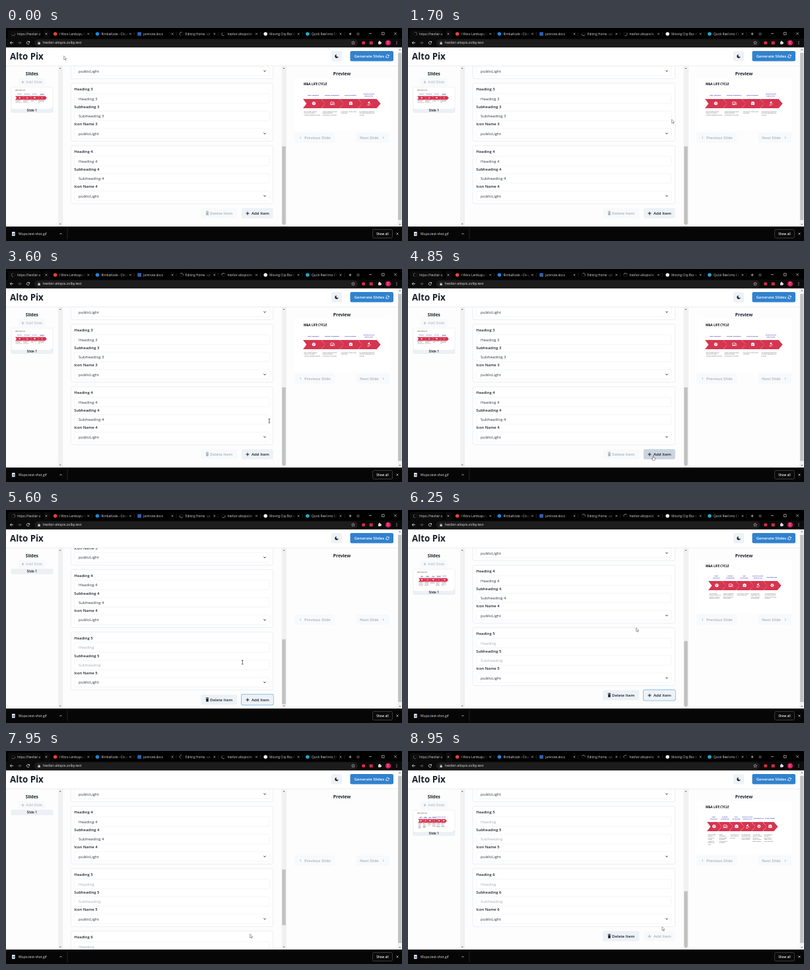
These frames come from a looping animation (600 by 324 pixels, 9 s). An HTML page with a canvas:

```html
<!DOCTYPE html>
<html lang="en">
<head>
<meta charset="utf-8">
<title>Slide editor</title>
<style>
html, body { margin: 0; width: 100%; height: 100%; overflow: hidden; background: #fff; }
canvas { display: block; width: 600px; height: 324px; }
</style>
</head>
<body>
<canvas id="stage"></canvas>
<script>
const W = 600, H = 324, LOOP = 9000;
const canvas = document.getElementById('stage');
const ratio = window.devicePixelRatio || 1;
canvas.width = W * ratio;
canvas.height = H * ratio;
const c = canvas.getContext('2d');
const INK = '#1a202c', MUTED = '#a9b1bd', EDGE = '#e2e6ec', RED = '#d63550';

// Scroll area: one card per item, buttons after the last card.
const VIEW = { top: 58, height: 243 }, PITCH = 95, FIELDS = [16, 42.5, 69];
const ADD1 = 4950, ADD2 = 7650;

const clamp = v => Math.max(0, Math.min(1, v));
const ease = v => { v = clamp(v); return v * v * (3 - 2 * v); };

function rect(x, y, w, h, fill, r = 0, stroke, lw = 0.5) {
  c.beginPath();
  c.roundRect(x, y, w, h, r);
  if (fill) { c.fillStyle = fill; c.fill(); }
  if (stroke) { c.strokeStyle = stroke; c.lineWidth = lw; c.stroke(); }
}

function disc(x, y, r, fill) {
  c.beginPath();
  c.arc(x, y, r, 0, 7);
  c.fillStyle = fill;
  c.fill();
}

function line(points, color, lw = 0.7, close = false, fill) {
  c.beginPath();
  for (let i = 0; i < points.length; i += 2) c.lineTo(points[i], points[i + 1]);
  if (close) c.closePath();
  if (fill) { c.fillStyle = fill; c.fill(); }
  if (color) { c.strokeStyle = color; c.lineWidth = lw; c.stroke(); }
}

function arc(x, y, r, from, to, color, lw = 0.8) {
  c.beginPath();
  c.arc(x, y, r, from, to);
  c.strokeStyle = color;
  c.lineWidth = lw;
  c.stroke();
}

function text(s, x, y, size, color = INK, weight = 400, align = 'left') {
  c.font = `${weight} ${size}px "Open Sans", "Noto Sans", sans-serif`;
  c.textAlign = align;
  c.textBaseline = 'alphabetic';
  c.fillStyle = color;
  c.fillText(s, x, y + size * 0.35);
}

function cross(x, y, r, color, lw = 0.6) {
  line([x - r, y - r, x + r, y + r], color, lw);
  line([x + r, y - r, x - r, y + r], color, lw);
}

function plus(x, y, r, color, lw = 0.9) {
  line([x - r, y, x + r, y], color, lw);
  line([x, y - r, x, y + r], color, lw);
}

function chevron(x, y, dx, dy, color, lw = 0.9) {
  line([x - dx - dy * 1.8, y - dy - dx * 1.8, x + dx, y + dy,
        x - dx + dy * 1.8, y - dy + dx * 1.8], color, lw);
}

function refresh(x, y, r, color) {
  arc(x, y, r, 3.5, 5.9, color);
  arc(x, y, r, 0.4, 2.8, color);
  line([x + r + 0.4, y - r, x + r + 0.4, y - 0.3, x + r - 1.7, y - 0.3], null, 0, true, color);
  line([x - r - 0.4, y + r, x - r - 0.4, y + 0.3, x - r + 1.7, y + 0.3], null, 0, true, color);
}

// ---- browser frame ----
const TABS = [
  ['https://hexfair-a'],
  ['I Wora Lembayu Ca', '#e0443a'],
  ['RimbaKode - Cloud', '#1688dd'],
  ['jamnote.docx', '#2b63b8', true],
  ['Editing Home · un'],
  ['hexfair-altopix/wi'],
  ['Moving Clip Box o', '#eeeeee'],
  ['Quick Reel into Cl', '#25a6c9']
];

function drawTabs(t) {
  rect(0, 0, W, 16, '#000');
  rect(3, 3, 64, 14, '#0b0b0b', 3);
  TABS.forEach(([label, icon, square], i) => {
    const x = 11 + i * 63.7;
    if (!icon) {
      const a = -t / 1320 * Math.PI * 2 - i;
      arc(x, 9, 2.7, 0, 7, '#242424', 0.6);
      arc(x, 9, 2.7, a, a + 2.6, i ? '#a0a0a0' : '#777', 0.7);
    } else if (square) rect(x - 2.8, 6.2, 5.6, 5.6, icon, 0.5);
    else disc(x, 9, 2.8, icon);
    c.save();
    c.beginPath();
    c.rect(x + 5, 3, 41, 12);
    c.clip();
    text(label, x + 6, 9, 4.7, '#d8d8d8');
    const fade = c.createLinearGradient(x + 38, 0, x + 46, 0);
    fade.addColorStop(0, 'rgba(0,0,0,0)');
    fade.addColorStop(1, '#000');
    c.fillStyle = fade;
    c.fillRect(x + 38, 3, 8, 12);
    c.restore();
    cross(x + 50, 9, 1.4, '#d0d0d0');
    if (i) line([x + 56, 6, x + 56, 12], '#3c3c3c', 0.5);
  });
  plus(521.5, 9, 2, '#e0e0e0', 0.7);
  disc(533.5, 9, 2.6, '#2a2a2a');
  chevron(533.5, 9, 0, 0.5, '#aaa', 0.5);
  line([550, 8.5, 554, 8.5], '#e8e8e8', 0.6);
  rect(569.5, 6.7, 3.6, 3.6, null, 0, '#e8e8e8', 0.6);
  cross(590, 8.5, 1.9, '#e8e8e8');
}

function drawToolbar() {
  rect(0, 16, W, 13.5, '#0b0b0b');
  line([11, 22.5, 6.3, 22.5], '#ddd', 0.8);
  line([8.5, 20.2, 6.2, 22.5, 8.5, 24.8], '#ddd', 0.8);
  line([18, 22.5, 22.7, 22.5], '#666', 0.8);
  line([20.5, 20.2, 22.8, 22.5, 20.5, 24.8], '#666', 0.8);
  arc(33.5, 22.5, 2.2, 0.5, 5.6, '#ddd');
  line([36, 19.8, 36, 22.2, 33.7, 22.2], null, 0, true, '#ddd');
  rect(43, 17.3, 490, 10.6, '#1c1c1c', 5.3);
  rect(48.3, 22, 3.6, 2.9, '#bdbdbd', 0.4);
  arc(50.1, 22, 1.2, Math.PI, 0, '#bdbdbd', 0.6);
  text('hexfair-altopix.zolby.test', 56, 22.6, 5.15, '#e6e6e6');
  const star = [];
  for (let i = 0; i < 10; i++) {
    const r = i % 2 ? 1.2 : 2.7, a = i * Math.PI / 5 - Math.PI / 2;
    star.push(526 + r * Math.cos(a), 22.6 + r * Math.sin(a));
  }
  line(star, '#d0d0d0', 0.5, true);
  disc(541.7, 22.5, 2.6, '#d9273a');
  rect(550.6, 20.3, 5.2, 4.8, '#c62c3e', 0.5);
  rect(564, 20.8, 4, 4, '#ddd', 0.5);
  disc(566, 20.6, 1, '#ddd');
  disc(568.2, 22.8, 1, '#ddd');
  disc(579, 22.5, 4, '#d81b60');
  text('C', 579, 22.5, 4.6, '#fff', 400, 'center');
  [-2, 0, 2].forEach(d => disc(592, 22.5 + d, 0.6, '#ddd'));
}

function drawShelf() {
  rect(0, 302, W, 22, '#060606');
  rect(9, 310, 4.6, 6.2, '#f2f2f2', 0.4);
  rect(9.8, 312.2, 3, 2.4, '#3f8fd8');
  text('Wupo.test-shot.gif', 19, 313.2, 5, '#e6e6e6');
  chevron(83, 313, 0, -0.8, '#ddd', 0.8);
  line([93, 305, 93, 321], '#3a3a3a', 0.6);
  rect(555.5, 306.5, 30, 13, '#0a0a0a', 2, '#5a5a5a', 0.6);
  text('Show all', 570.5, 313, 4.6, '#f0f0f0', 600, 'center');
  cross(593, 313, 1.5, '#ddd', 0.7);
}

function scrollbar(x, top, bottom, from, to) {
  rect(x, top, 6.4, bottom - top, '#f1f1f1');
  const m = x + 3.2;
  line([m - 1.5, top + 4, m + 1.5, top + 4, m, top + 2.4], null, 0, true, '#606060');
  line([m - 1.5, bottom - 4, m + 1.5, bottom - 4, m, bottom - 2.4], null, 0, true, '#606060');
  if (to) rect(x + 0.5, from, 5.4, to - from, '#c1c1c1');
}

// ---- slide picture ----
const STEPS = [
  ['M&A', 'STRATEGY', 'M&A strategy analyses reasons to achieve continued growth and focus'],
  ['TARGET', 'SCREENING', 'Target screening is about finding the fitting companies for the buyer'],
  ['DUE', 'DILIGENCE', 'The process of a fair check of the facts'],
  ['TRANSACTION', 'EXECUTION', 'By moving the transaction one must negotiate, price and sign'],
  ['INTEGRATION', '', 'It is the step where all of the teams are joined and the work is shared'],
  ['DIVESTITURE', '', 'Also known as the sale of parts that no longer fit the core of the firm']
];
const LAYOUT = { 4: [450, 28, 33.6], 5: [455, 21, 26.6], 6: [453, 17, 22.4] };

function wrap(words, width) {
  const lines = [''];
  for (const word of words.split(' ')) {
    const last = lines[lines.length - 1], next = last ? last + ' ' + word : word;
    if (c.measureText(next).width <= width || !last) lines[lines.length - 1] = next;
    else lines.push(word);
  }
  return lines;
}

const ICONS = {
  globe(x, y) {
    disc(x, y, 2.7, '#fff');
    line([x - 1.8, y - 1.2, x, y - 0.3, x - 0.5, y + 1.7], RED, 0.6);
    line([x + 0.6, y - 2, x + 1.8, y + 0.4], RED, 0.6);
  },
  devices(x, y) {
    rect(x - 2.7, y - 2, 4.7, 3, null, 0.3, '#fff', 0.7);
    line([x - 3.2, y + 2, x + 0.8, y + 2], '#fff', 0.8);
    rect(x + 1.2, y - 0.7, 2, 2.8, RED, 0.2, '#fff', 0.6);
  },
  file(x, y) {
    rect(x - 2.5, y - 2, 5, 4.4, '#fff', 0.6);
    rect(x - 1, y - 2.7, 2, 1, '#fff');
    line([x - 1.3, y - 0.3, x + 1.3, y - 0.3], RED, 0.5);
    line([x - 1.3, y + 1, x + 0.8, y + 1], RED, 0.5);
  },
  gavel(x, y) {
    line([x - 1.8, y - 0.2, x + 0.6, y - 2.5], '#fff', 1.5);
    line([x - 0.6, y - 1.2, x + 2.3, y + 1.7], '#fff', 0.9);
    line([x - 2.8, y + 2.4, x + 0.6, y + 2.4], '#fff', 0.9);
  },
  gear(x, y) {
    for (let a = 0; a < 3; a++) {
      const dx = 2.7 * Math.cos(a * Math.PI / 3), dy = 2.7 * Math.sin(a * Math.PI / 3);
      line([x - dx, y - dy, x + dx, y + dy], '#fff', 1.1);
    }
    disc(x, y, 2, '#fff');
    disc(x, y, 0.9, RED);
  }
};
const ICON_ORDER = ['globe', 'devices', 'file', 'gavel', 'gear', 'file'];

function drawSlide(n) {
  const [left, pitch, width] = LAYOUT[n];
  rect(438, 76, 144, 80, '#fff');
  text('M&A LIFE CYCLE', 451, 85.5, 4.5, '#111', 700);
  for (let i = 0; i < n; i++) {
    const [a, b, note] = STEPS[i], x = left + i * pitch, mid = x + width / 2 - 1;
    line([x, 108, x + width - 6, 108, x + width, 115, x + width - 6, 122, x, 122, x + 5.4, 115],
      null, 0, true, RED);
    ICONS[ICON_ORDER[i]](mid + 0.6, 114.6);
    const label = (s, y) => text(s, mid, y, 2.3, '#2525b4', 700, 'center');
    if (!b || (n === 4 && i < 3)) label(b ? a + ' ' + b : a, 102);
    else { label(a, 100.4); label(b, 103.6); }
    c.font = '400 1.9px "Open Sans", sans-serif';
    wrap(note, pitch - 3).forEach((s, k) => text(s, x + 1.5, 127 + k * 2.55, 1.9, '#222'));
  }
}

// ---- page ----
function button(x, y, w, label, textX, disabled, fill) {
  rect(x, y, w, 15.5, disabled ? '#f7f9fb' : fill || '#edf2f7', 2.3);
  text(label, textX, y + 8, 6.1, disabled ? MUTED : INK, 600);
}

function drawHeader() {
  rect(0, 29.5, W, 28.5, '#fff');
  line([0, 57.7, 594, 57.7], '#e3e6ea', 0.7);
  text('Alto Pix', 6, 43.8, 13.3, INK, 700);
  rect(493, 35, 16, 15.5, '#edf2f7', 2.3);
  disc(501, 43, 2.7, INK);
  disc(502.4, 41.8, 2.1, '#edf2f7');
  rect(521.5, 35, 65.5, 15.5, '#3182ce', 2.3);
  text('Generate Slides', 527.7, 43, 6.05, '#fff', 600);
  refresh(578, 43, 2.3, '#fff');
}

function drawSidebar(s) {
  text('Slides', 39.3, 69.3, 6.6, INK, 700, 'center');
  rect(18.5, 76, 41.5, 12, '#f7f9fb', 2);
  plus(25.5, 82.3, 2, MUTED, 0.8);
  text('Add Slide', 30, 82.3, 5.75, MUTED);
  const y = s.loaded ? 121 : 89.8;
  rect(8, 89.8, 63, s.loaded ? 38.7 : 7.4, '#fff', 1.5);
  rect(8, y, 63, 7.4, '#edf0f4', 1.5);
  if (s.loaded) {
    c.save();
    c.translate(-169.2, 59.5);
    c.scale(0.407, 0.407);
    drawSlide(s.count);
    c.restore();
  }
  rect(8, 89.8, 63, s.loaded ? 38.7 : 7.4, null, 1.5, '#dfe3e8', 0.5);
  text('Slide 1', 39.3, y + 3.8, 5, INK, 600, 'center');
  scrollbar(79, 58, 301.5);
  line([85.7, 58, 85.7, 302], '#e2e6ec', 0.5);
}

function drawPreview(s) {
  text('Preview', 509, 69.3, 6.7, INK, 700, 'center');
  if (s.loaded) drawSlide(s.count);
  button(437, 159, 61, '', 0, true);
  chevron(446.3, 166.7, -0.8, 0, MUTED, 0.8);
  text('Previous Slide', 452, 166.7, 5.95, MUTED, 600);
  button(530.5, 159, 50.5, '', 0, true);
  text('Next Slide', 536, 166.7, 5.95, MUTED, 600);
  chevron(571.7, 166.7, 0.8, 0, MUTED, 0.8);
}

const cardTop = (i, scroll) => 179 + PITCH * (i - 4) + 239 - scroll;

function drawCard(i, y) {
  rect(98.3, y, 306.4, 88, '#fff', 2.3, EDGE, 0.7);
  const blank = i > 4, n = ' ' + i;
  const rows = [['Heading', blank ? 'Heading' : 'Heading' + n],
                ['Subheading', blank ? 'Subheading' : 'Subheading' + n],
                ['Icon Name', 'publicLight']];
  rows.forEach(([name, value], k) => {
    const top = y + FIELDS[k];
    text(name + n, 103.3, top - 6.6, 5.85, INK, 600);
    rect(103.5, top, 295.7, 14.6, '#fff', 2.2, '#eceff3', 0.6);
    text(value, 110, top + 7.6, 6.05, blank && k < 2 ? '#a7aeb9' : '#2d3748');
  });
  chevron(392, y + FIELDS[2] + 7.4, 0, 0.9, INK, 0.9);
}

function drawEditor(s, mouse) {
  c.save();
  c.beginPath();
  c.rect(86, VIEW.top, 339, VIEW.height + 0.7);
  c.clip();
  for (let i = 1; i <= s.count; i++) {
    const y = cardTop(i, s.scroll);
    if (y > -90 && y < 302) drawCard(i, y);
  }
  const y = s.buttons, noDelete = s.count === 4, noAdd = s.count === 6;
  button(295.3, y, 55, 'Delete Item', 309, noDelete);
  const bin = noDelete ? MUTED : INK;
  rect(303.2, y + 6.2, 3.6, 4.6, bin, 0.5);
  line([302.5, y + 5.2, 307.5, y + 5.2], bin, 0.8);
  rect(304.2, y + 4.2, 1.6, 1, bin);
  if (s.focus) rect(356.6, y - 0.4, 48.6, 16.3, null, 2.6, '#8fbde8', 1.2);
  const fill = s.pressed ? '#cbd5e0' : mouse.kind === 'hand' ? '#e2e8f0' : '#edf2f7';
  button(357, y, 47.8, 'Add Item', 372, noAdd, fill);
  plus(366, y + 8, 2.5, noAdd ? MUTED : INK, 1);
  c.restore();
  const track = 234, start = 64, k = track / s.content;
  scrollbar(417.8, 58, 301.5, start + s.scroll * k, start + (s.scroll + VIEW.height) * k);
  line([424.6, 58, 424.6, 302], '#e2e6ec', 0.5);
}

// ---- motion ----
const PATH = [
  [0, 87.7, 42.5], [200, 87.7, 42.5], [1500, 399.6, 139], [1900, 399.6, 139],
  [3200, 398.9, 231], [3700, 398.9, 231], [4600, 371, 284.5], [5150, 371, 284.5],
  [6050, 345.7, 179], [6500, 345.7, 179], [7350, 370, 281], [7700, 370, 281],
  [7950, 369.7, 278.3], [8300, 369.7, 278.3], [8850, 385, 267.3], [9000, 385, 267.3]
];

function pointer(t, s) {
  const i = PATH.findIndex(p => p[0] > t), [t0, x0, y0] = PATH[i - 1], [t1, x1, y1] = PATH[i];
  const p = ease((t - t0) / (t1 - t0)), x = x0 + (x1 - x0) * p, y = y0 + (y1 - y0) * p;
  let kind = 'arrow';
  if (s.count < 6 && x > 357 && x < 405 && y > s.buttons && y < s.buttons + 15.5) kind = 'hand';
  for (let n = 1; n <= s.count; n++) {
    const d = y - cardTop(n, s.scroll);
    const over = FIELDS.slice(0, 2).some(f => d > f && d < f + 14.6);
    if (over && x > 103 && x < 399.2 && y > VIEW.top) kind = 'text';
  }
  return { x, y, kind };
}

function stateAt(t) {
  const count = t < ADD1 ? 4 : t < ADD2 ? 5 : 6;
  const scroll = 239 + PITCH * (ease((t - 5350) / 300) + ease((t - 8200) / 300));
  return {
    count, scroll,
    content: 102 + PITCH * count,
    buttons: cardTop(count + 1, scroll),
    loaded: !(t >= ADD1 && t < 5700) && !(t >= ADD2 && t < 8500),
    pressed: (t >= 4820 && t < ADD1) || (t >= 7550 && t < ADD2),
    focus: count === 5
  };
}

function drawPointer({ x, y, kind }) {
  if (kind === 'text') {
    line([x, y - 3, x, y + 3], '#222', 0.7);
    line([x - 1.3, y - 3, x + 1.3, y - 3], '#222', 0.6);
    line([x - 1.3, y + 3, x + 1.3, y + 3], '#222', 0.6);
  } else if (kind === 'hand') {
    line([x, y, x + 1, y, x + 1, y + 2.2, x + 3.6, y + 2.8, x + 3.4, y + 5.6, x + 2.6, y + 6.6,
      x - 0.2, y + 6.6, x - 2, y + 3.8, x - 1.2, y + 3.2, x, y + 4.2], '#333', 0.5, true, '#fff');
  } else {
    line([x, y, x, y + 5.8, x + 1.3, y + 4.6, x + 2.3, y + 6.7, x + 3.2, y + 6.3,
      x + 2.3, y + 4.2, x + 4, y + 4.1], '#444', 0.5, true, '#fff');
  }
}

function frame(now) {
  const t = now % LOOP, s = stateAt(t), mouse = pointer(t, s);
  c.setTransform(ratio, 0, 0, ratio, 0, 0);
  rect(0, 0, W, H, '#fdfdfd');
  drawEditor(s, mouse);
  drawSidebar(s);
  drawPreview(s);
  drawHeader();
  scrollbar(593.6, 29.5, 302, 38, 292);
  drawTabs(t);
  drawToolbar();
  drawShelf();
  drawPointer(mouse);
  requestAnimationFrame(frame);
}
requestAnimationFrame(frame);
</script>
</body>
</html>
```
